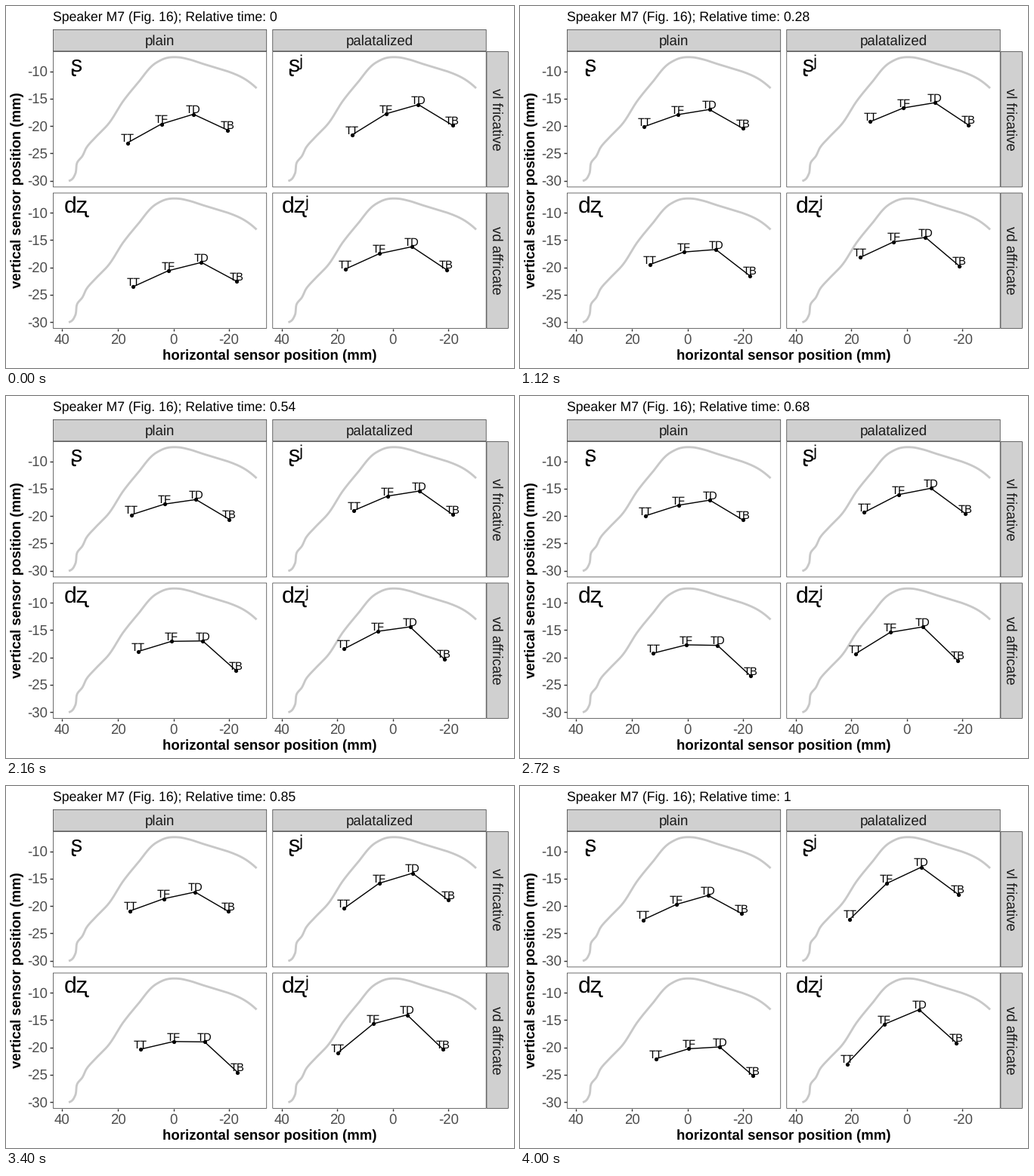
Write a matplotlib script that moves like this. It is 672 px wide and 480 px high and loops after 4.04 s.

```python
import numpy as np
import matplotlib.pyplot as plt
from matplotlib.animation import FuncAnimation
from matplotlib.patches import Rectangle

W, H, DPI = 672, 480, 96
FRAMES, INTERVAL = 101, 40
PT = 72 / DPI
EDGE, STRIP, PALATE = "#333333", "#D0D0D0", "#C8C8C8"
plt.rcParams["font.family"] = ["Liberation Sans", "DejaVu Sans"]
plt.rcParams["text.hinting"] = "none"

# Panel geometry in pixels
LEFT, TOP, PW, PH, GAP, BAND = 62, 60.2, 283.1, 180.1, 7.33, 29.2
DX, DY = PW + GAP, PH + GAP
BIG = 14 / PT

# Key times for sensor x and y; the chain keeps its spacing along x
X_KEYS, Y_KEYS = [0, 0.54, 1], [0, 0.15, 0.54, 0.85, 1]
SPACING = np.array([0, 0.34, 0.66, 1])
SENSORS = ("TT", "TF", "TD", "TB")

# Per panel: label, x of TT, x of TB, then y of each sensor at the key times
PANELS = [
    ("\u0282", [160.5, 165.8, 162.7], [293, 295.3, 293],
     [[181.5, 164, 157.5, 165.5, 177.5], [156.5, 146.5, 143.3, 149.5, 157],
      [143.5, 138, 137.3, 140.6, 145], [164.5, 162.2, 163.5, 166.3, 169]]),
    ("\u0282\u02b2", [458, 460.2, 436.4], [590.5, 591.3, 579.5],
     [[170.7, 157, 151.8, 162.5, 176.5], [142.8, 136, 132.7, 129, 129.2],
      [130.7, 128, 126, 115.6, 107.6], [158, 157.2, 157.5, 151, 143.5]]),
    ("d\u0290", [168.2, 175, 179.5], [305, 304.2, 308],
     [[372.2, 350, 338.7, 349, 361.8], [351, 333.3, 325.3, 338.8, 348.4],
      [340, 328.5, 324.8, 339.3, 346], [365, 360, 364, 379.5, 384]]),
    ("d\u0290\u02b2", [448.5, 447, 432.5], [582.5, 579.6, 577.3],
     [[349, 338, 335.4, 354, 368.5], [328.3, 316.5, 312, 315.2, 316],
      [319.2, 310.3, 306.1, 303.5, 296.5], [349.5, 345.6, 348.6, 349, 340.6]]),
]


def x_basis(t):
    return np.array([1, t, t * t])


def y_basis(t):
    """Fast settling at the onset on top of a cubic drift."""
    return np.array([1, np.exp(-t / 0.1), t, t * t, t ** 3])


def track(basis, keys, values):
    """Motion t -> value passing through the key values."""
    coef = np.linalg.solve([basis(k) for k in keys], np.transpose(values))
    return lambda t: basis(t) @ coef


def smooth_path(points, n=240):
    """Cubic Hermite curve through points, by chord length."""
    p = np.array(points, float)
    s = np.r_[0, np.cumsum(np.hypot(*np.diff(p, axis=0).T))]
    m = np.gradient(p, s, axis=0, edge_order=2)
    t = np.linspace(0, s[-1], n)
    k = np.clip(np.searchsorted(s, t, "right") - 1, 0, len(s) - 2)
    h = (s[k + 1] - s[k])[:, None]
    u = (t - s[k])[:, None] / h
    return ((1 + 2 * u) * (1 - u) ** 2 * p[k] + u * (1 - u) ** 2 * h * m[k]
            + u * u * (3 - 2 * u) * p[k + 1] + u * u * (u - 1) * h * m[k + 1])


roof = smooth_path([
    (83, 232), (87, 230), (91.5, 223), (94.5, 207), (101, 199), (106, 188.5),
    (119.5, 173), (134.5, 157.5), (156, 124.7), (174, 102.5), (199, 75),
    (212, 69), (228, 68), (243, 71), (260, 76.5), (278, 82), (292, 86.2),
    (317, 97.5), (331.5, 109)])

fig = plt.figure(figsize=(W / DPI, H / DPI), dpi=DPI, facecolor="white")
ax = fig.add_axes([0, 0, 1, 1])
ax.set_xlim(0, W)
ax.set_ylim(H, 0)
ax.axis("off")


def write(x, y, s, px, color="black", ha="center", **kw):
    return ax.text(x, y, s, fontsize=px * PT, color=color, ha=ha,
                   va="baseline", rotation_mode="anchor", **kw)


def line(x, y, px, color, **kw):
    return ax.plot(x, y, color=color, lw=px * PT,
                   solid_capstyle="butt", **kw)[0]


def box(x, y, w, h, fill, z):
    """Rectangle whose thin border lies inside its bounds."""
    lw = 0.71
    ax.add_patch(Rectangle((x + lw / 2, y + lw / 2), w - lw, h - lw,
                           facecolor=fill, edgecolor=EDGE, lw=lw * PT,
                           zorder=z, snap=False))


for col, name in enumerate(("plain", "palatalized")):
    x0 = LEFT + DX * col
    box(x0, TOP - BAND, PW, BAND, STRIP, 1)
    write(x0 + PW / 2, 52.2, name, BIG, "#1A1A1A")
    for v in (40, 20, 0, -20):
        x = x0 + 159.5 - 3.678 * v
        line([x, x], [427.6, 431.2], 1.42, EDGE)
        write(x, 448, str(v), BIG, "#4D4D4D")

for row, name in enumerate(("vl fricative", "vd affricate")):
    y0 = TOP + DY * row
    box(LEFT + DX + PW, y0, BAND, PH, STRIP, 1)
    write(643.4, y0 + PH / 2, name, BIG, "#1A1A1A", rotation=270)
    for v in range(-10, -31, -5):
        y = y0 - 46.2 - 7.254 * v
        line([58.3, 62], [y, y], 1.42, EDGE)
        write(55, y + 6.4, str(v), BIG, "#4D4D4D", ha="right")

write(348.8, 469.2, "horizontal sensor position (mm)", BIG, weight="bold")
write(20.2, 244, "vertical sensor position (mm)", BIG, weight="bold",
      rotation=90)
title = write(62, 19.4, "", 17.6, ha="left")

chains = []
for i, (phone, tip, back, heights) in enumerate(PANELS):
    row, col = divmod(i, 2)
    dx, dy = DX * col, DY * row
    line(roof[:, 0] + dx, roof[:, 1] + dy, 2.85, PALATE, zorder=2)
    box(LEFT + dx, TOP + dy, PW, PH, "none", 3)
    write(92.7 + dx, 86.6 + dy, phone, 30.3, zorder=4)
    chain = line([], [], 1.42, "black", marker="o", ms=5.2 * PT, mew=0,
                 zorder=5)
    tags = [write(0, 0, s, 14.7, zorder=6) for s in SENSORS]
    chains.append((chain, tags, track(x_basis, X_KEYS, [tip, back]),
                   track(y_basis, Y_KEYS, heights)))


def update(i):
    t = i / (FRAMES - 1)
    title.set_text(f"Speaker M7 (Fig. 16); Relative time: {t:g}")
    for chain, tags, ends, heights in chains:
        tip, back = ends(t)
        xs, ys = tip + (back - tip) * SPACING, heights(t)
        chain.set_data(xs, ys)
        for tag, x, y in zip(tags, xs, ys):
            tag.set_position((x, y - 1.2))
    return [title]


anim = FuncAnimation(fig, update, frames=FRAMES, interval=INTERVAL,
                     repeat=True, repeat_delay=0, blit=False)
plt.show()
```
